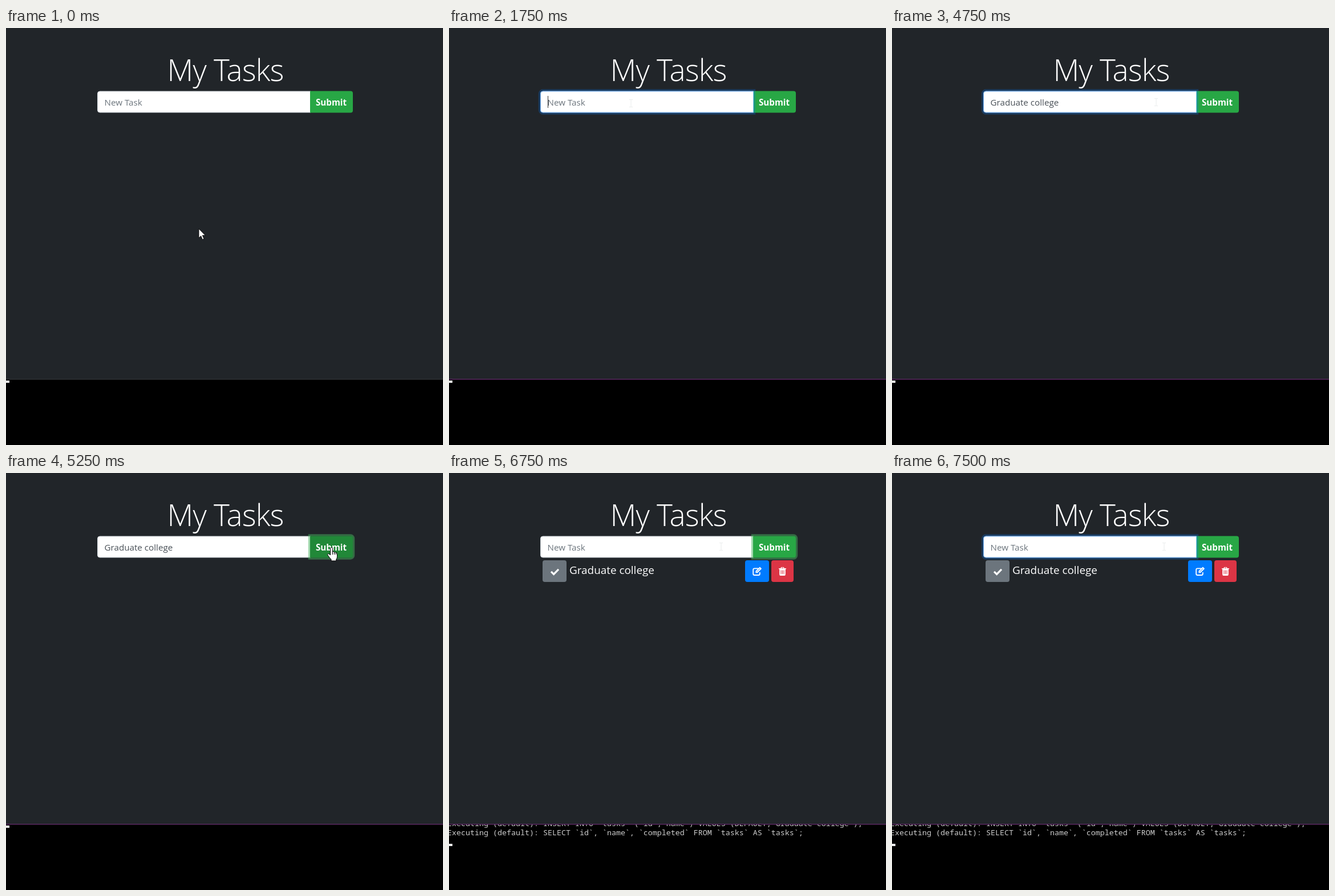
An HTML page for the animation above (8000 ms loop, 766 by 731 pixels).

```html
<!DOCTYPE html>
<html lang="en">
<head>
<meta charset="utf-8">
<title>My Tasks</title>
<style>
  html, body { margin: 0; width: 100%; height: 100%; overflow: hidden; background: #212529; }
  svg { display: block; }
  text { white-space: pre; font-family: "Open Sans", "Noto Sans", sans-serif; }
  .title { font-size: 53px; font-weight: 300; letter-spacing: -.8px; fill: #fff; text-anchor: middle; }
  .field { font-size: 15.2px; }
  .submit { font-size: 15.2px; font-weight: 700; fill: #fff; text-anchor: middle; }
  .task { font-size: 18.9px; fill: #fff; }
  .log { font-family: "Noto Sans Mono", "DejaVu Sans Mono", monospace; font-size: 13.333px; fill: #ccc; }
  .icon { fill: #fff; }
  .line { fill: none; stroke: #fff; stroke-width: 1.8; }
</style>
</head>
<body>
<svg width="766" height="731" viewBox="0 0 766 731">
  <rect width="766" height="731" fill="#212529"/>
  <text class="title" x="384.5" y="92.5">My Tasks</text>

  <path d="M534 111H164.5a4 4 0 0 0-4 4v29a4 4 0 0 0 4 4H534z" fill="#fff" stroke="#ced4da"/>
  <text id="field" class="field" x="172.5" y="135.5"></text>
  <rect id="caret" y="119" width="1" height="21" fill="#333"/>

  <path id="button" d="M533 110.5h71a4 4 0 0 1 4 4v30a4 4 0 0 1-4 4h-71z"/>
  <path id="buttonRing" d="M531.4 108.9H604a5.6 5.6 0 0 1 5.6 5.6v30a5.6 5.6 0 0 1-5.6 5.6h-72.6z"
        fill="none" stroke="#48b461" stroke-opacity=".5" stroke-width="3.2"/>
  <text class="submit" x="570" y="135.5">Submit</text>

  <g id="inputRing" fill="none">
    <path d="M533.5 111H164.5a4 4 0 0 0-4 4v29a4 4 0 0 0 4 4h369z" stroke="#80bdff"/>
    <path d="M535.6 108.9H164.5a6 6 0 0 0-6 6v29.2a6 6 0 0 0 6 6h371.1z"
          stroke="#007bff" stroke-opacity=".25" stroke-width="3.2"/>
  </g>

  <g id="list">
    <rect id="done" x="164" y="153" height="38" rx="4" fill="#6c757d"/>
    <text id="task" class="task" y="177">Graduate college</text>
    <rect id="edit" y="153" height="38" rx="4" fill="#007bff"/>
    <rect id="remove" y="153" height="38" rx="4" fill="#dc3545"/>
    <g id="icons">
      <path class="line" style="stroke-width:3.2" d="M179 172.8l4.6 4.6 8.4-8.6"/>
      <path class="line" d="M542.5 167.4h-7a2.3 2.3 0 0 0-2.3 2.3v7a2.3 2.3 0 0 0 2.3 2.3h7a2.3 2.3 0 0 0 2.3-2.3V174"/>
      <path class="icon" d="M537.5 175.2v-3.4l7.4-7.2 3.2 3.2-7.4 7.4z"/>
      <path d="M539.2 173.4l5.8-5.8" stroke="#007bff"/>
      <path class="icon" d="M578 167h3.3l.8-2h4.8l.8 2h3.3v1.5h-1.2v9.4q0 2-1.8 2h-7q-1.8 0-1.8-2v-9.4H578z"/>
      <path d="M582 170.5v6.5m2.5-6.5v6.5m2.5-6.5v6.5M582.8 166.5h3.4" stroke="#dc3545"/>
    </g>
  </g>

  <rect y="616" width="766" height="115"/>
  <clipPath id="console"><path d="M0 616h766v115H0z"/></clipPath>
  <g id="log" class="log" clip-path="url(#console)">
    <text class="log" x="-3" y="619">Executing (default): INSERT INTO `tasks` (`id`,`name`) VALUES (DEFAULT,'Graduate college');</text>
    <text class="log" x="-3" y="635">Executing (default): SELECT `id`, `name`, `completed` FROM `tasks` AS `tasks`;</text>
  </g>
  <rect id="edge" y="615" width="766" height="1.5"/>
  <rect id="prompt" width="6" height="4" fill="#f2f2f2"/>

  <path id="arrow" d="M0 0v16l3.7-3.5 2.7 6.2 2.6-1.1-2.7-6h5z" fill="#fff" stroke="#000" stroke-width=".8"/>
  <path id="beam" d="M-3-6.5h2.5l.5.5.5-.5H3M0-6V6M-3 6.5h2.5L0 6l.5.5H3" fill="none" stroke="#e9ecec"/>
  <path id="hand" d="M5.5 14V2.5a2 2 0 0 1 4 0V8q2.3-1 3 .8 2.2-.6 2.7 1 2.3-.3 2.3 2v5q0 3-1.7 4.5V24H7v-2.5Q4.500 19 1.300 14.500q-1.500-2.500.5-3 1.700-.3 3.700 2.500z M9.500 8v5m3-4.200v4.200m2.700-3.200v3.200" fill="#fff" stroke="#000"/>
</svg>
<script>
const LOOP = 8000;
const $ = id => document.getElementById(id);
const set = (id, attributes) => {
  for (const name in attributes) $(id).setAttribute(name, attributes[name]);
};

// Each track lists [start time, value]; a value holds until the next start.
const typed = [[0, ""], [2250, "G"], [2500, "Gradu"], [2750, "Graduate"], [3000, "Graduate "],
  [3500, "Graduate co"], [3750, "Graduate coll"], [4000, "Graduate colle"],
  [4250, "Graduate college"], [5500, ""]];
const caretOn = [[0, 0], [750, 1], [1250, 0], [1750, 1], [4750, 0], [7000, 1], [7500, 0]];
const inputFocus = [[0, 0], [750, 1], [5250, 0], [7000, .5], [7250, 1]];
const buttonFocus = [[0, 0], [5250, 1], [7000, .5], [7250, 0]];
const hover = [[0, 0], [5000, 1], [6500, 0]];
const pointer = [[0, ["arrow", 338, 352]], [250, ["beam", 334, 141]], [500, ["beam", 334, 139]],
  [750, ["beam", 319, 132]], [4750, ["beam", 463, 130]], [5000, ["hand", 563, 130]],
  [6250, ["hand", 559, 128]], [6500, ["beam", 477, 128]], [6750, ["beam", 477, 129]]];

const at = (track, t) => track.findLast(([start]) => start <= t)[1];

function draw(t) {
  const value = at(typed, t);
  const field = $("field");
  const content = value || "New Task";
  if (field.textContent !== content) field.textContent = content;
  set("field", { fill: value ? "#495057" : "#6c757d" });
  const caretX = 173 + (value ? field.getComputedTextLength() - 1 : 0);
  set("caret", { x: Math.round(caretX), opacity: at(caretOn, t) });

  set("inputRing", { opacity: at(inputFocus, t) });
  set("buttonRing", { opacity: at(buttonFocus, t) });
  set("button", { fill: at(hover, t) ? "#218838" : "#28a745" });

  const saved = t >= 5500;
  const loaded = t >= 5750;
  set("list", { opacity: +saved });
  set("log", { opacity: +saved });
  set("prompt", { y: saved ? 650 : 618 });
  set("icons", { opacity: +loaded });
  set("done", { width: loaded ? 42 : 38 });
  set("task", { x: loaded ? 211 : 207 });
  set("edit", { x: loaded ? 519 : 523, width: loaded ? 42 : 38 });
  set("remove", { x: loaded ? 565 : 566, width: loaded ? 39 : 38 });
  set("edge", { fill: t < 750 ? "#303236" : "#5b2a63" });

  const [shape, x, y] = at(pointer, t);
  for (const id of ["arrow", "beam", "hand"]) {
    set(id, { opacity: +(id === shape), transform: `translate(${x} ${y})` });
  }
}

const begin = performance.now();
function tick() {
  draw((performance.now() - begin) % LOOP);
  requestAnimationFrame(tick);
}
tick();
</script>
</body>
</html>
```
